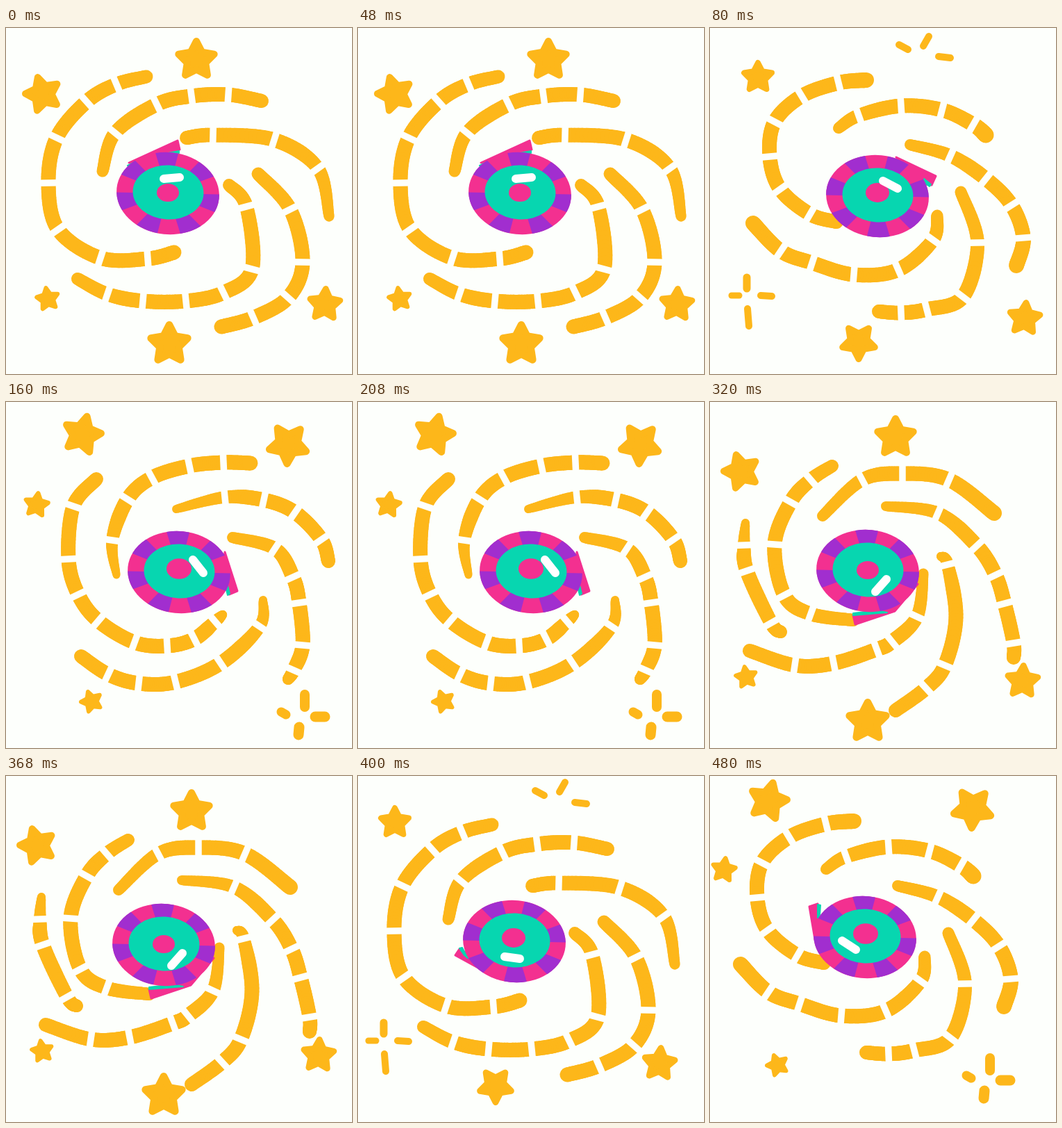
Write an HTML page with a canvas that moves like this. It is 498 by 498 pixels and loops after 0.56 s.

```html
<!DOCTYPE html>
<html lang="en">
<head>
<meta charset="utf-8">
<title>Swirling eye</title>
<style>
  html, body { margin: 0; width: 100%; height: 100%; overflow: hidden; background: #fdfffc; }
  canvas { display: block; }
</style>
</head>
<body>
<canvas id="stage" width="498" height="498"></canvas>
<script>
const ctx = document.getElementById('stage').getContext('2d');
const PAPER = '#fdfffc', GOLD = '#fdb71a', PINK = '#f33090', PURPLE = '#a12ecf', TEAL = '#07d6b0';
const STEP = 80;

// Arm: start width, end width, points. Inner points are gaps unless marked "~".
const swirls = [
  ['19 21 202,70 159,81 116,106 73,158 61,223 75,290 136,331 204,332 242,323',
   '17 20 139,206 157,151 217,110 267,98 320,96 368,105',
   '20 15 260,158 298,154 386,161 449,202 465,271',
   '19 21 363,210 409,261 427,337 406,388 356,417 310,430',
   '18 18 321,226 346,257 354,347 313,381 259,393 197,393 146,383 103,361'],
  ['22 20 225,75 185,79 132,98 93,135 86,185 101,232 144,268 182,279',
   '16 23 185,144 214,126 275,112 334,118 379,139 397,154',
   '16 22 288,168 346,184 397,217 434,255 451,302 441,342',
   '17 20 361,236 385,309 364,387 312,405 275,410 243,408',
   '17 22 327,270 321,305 271,348 207,355 147,338 102,321 62,281'],
  ['20 12 130,111 97,150 90,226 104,277 133,315 185,346 232,351 271,341 301,316 312,306',
   '11 21 159,249 153,199 175,140 210,109 264,92 313,87 352,88',
   '12 20 245,154 315,137 371,141 416,159 454,198 464,229',
   '16 16 326,195 387,211 413,252 422,289 427,350 414,386 406,399',
   '12 20 370,285 365,323 309,376 244,403 191,405 147,392 108,366'],
  ['18 13 150,89 105,114 74,178 70,233 87,281 128,318 174,334 218,335 250,327 272,318',
   '14 20 135,217 142,172 184,129 228,109 286,106 334,114 377,129',
   '13 22 248,157 325,161 379,179 424,213 450,259 450,292',
   '14 16 315,219 373,252 389,298 388,334 371,390 352,419 334,432',
   '14 22 332,316 323,345 248,378 170,384 118,368 78,340 51,310'],
  ['12 18 51,174 49,206 53,243 88,318 102,331',
   '18 18 176,92 145,112 116,144 93,205 107,278 145,305 206,314',
   '16 22 162,164 219,112 277,103 344,112 409,160',
   '14 20 253,150 328,160 384,207 411,249 424,290 437,347 437,368',
   '12 20 332,222 342,234 ~354,310 338,379 311,412 267,444',
   '15 20 307,247 298,309 262,345 240,356 178,376 122,379 57,358']
];

// Spark: width and two ends
const dashes = ['10 272,24 285,31', '10 307,26 315,12', '10 329,41 346,43'];
const cross = ['11 53,359 53,375', '9 31,385 42,385', '10 73,385 89,386', '10 54,404 56,429'];
const petals = ['14 430,421 430,439', '13 396,446 403,450', '15 445,453 459,453', '15 422,468 421,479'];
const burst = ['12 462,329 462,349', '11 398,440 413,422', '10 352,440 366,446',
  '12 359,486 372,468', '11 403,470 419,481'];

// Stars: x, y, radius, tilt in degrees. Eye: centre. Pupil: x, y, radius.
const poses = [
  { swirl: 0, eye: [233, 238], pupil: [233, 237, 16], shine: '12 227,217 250,215',
    tail: '177,194 247,162 250,175 215,192', lining: '175,198 198,187 249,177 249,180 210,192',
    stars: [[274, 46, 32, 0], [53, 95, 30, -17], [235, 455, 33, 0], [60, 390, 19, -9], [459, 398, 27, 3]] },
  { swirl: 1, eye: [241, 242], pupil: [241, 237, 17], shine: '12 249,220 270,231',
    tail: '268,186 325,213 319,226 300,224', lining: '308,217 318,225 316,228 310,224',
    stars: [[69, 71, 25, 0], [214, 452, 29, 36], [453, 418, 27, 5]],
    sparks: [[dashes, 0, 0], [cross, 0, 0]] },
  { swirl: 2, eye: [249, 245], pupil: [249, 240, 18], shine: '12 269,227 284,246',
    tail: '315,216 333,272 321,277 312,255', lining: '315,262 319,264 322,276 319,278',
    stars: [[110, 47, 32, 14], [406, 61, 33, -33], [44, 148, 20, 8], [123, 431, 18, -20]],
    sparks: [[petals, 0, 0]] },
  { swirl: 3, eye: [237, 244], pupil: [240, 244, 19], shine: '12 269,231 273,256',
    tail: '310,254 286,320 274,315 294,285', lining: '272,312 290,293 293,290 276,314',
    stars: [[242, 43, 21, -18], [447, 100, 38, 2], [83, 107, 19, -5], [137, 420, 18, 10]],
    sparks: [[burst, 0, 0]] },
  { swirl: 4, eye: [227, 243], pupil: [227, 242, 16], shine: '12 238,273 254,255',
    tail: '206,307 209,320 266,301 299,262 240,302', lining: '206,304 240,300 255,303 206,307',
    stars: [[267, 51, 32, 0], [45, 100, 30, -17], [227, 460, 33, 0], [52, 396, 18, -9], [450, 402, 27, 3]] },
  { swirl: 0, dx: -9, dy: 0, eye: [225, 238], pupil: [224, 233, 17], shine: '12 211,260 233,263',
    tail: '140,258 146,249 170,262 200,291', lining: '146,248 150,247 158,262 153,258',
    stars: [[53, 67, 25, 0], [198, 446, 28, 36], [434, 414, 27, 5]],
    sparks: [[dashes, -17, -3], [cross, -16, -4]] },
  { swirl: 1, dx: -18, dy: -10, eye: [223, 232], pupil: [224, 227, 18], shine: '12 190,237 210,250',
    tail: '143,188 155,184 158,215 151,235', lining: '155,185 159,186 158,200 155,204',
    stars: [[84, 36, 32, 14], [378, 47, 33, -33], [20, 135, 20, 8], [97, 416, 18, -20]],
    sparks: [[petals, -27, -15]] }
];

const points = words => words.map(w => w.replace('~', '').split(',').map(Number));

function line(a, b, width, color, cap = 'round') {
  ctx.strokeStyle = color;
  ctx.lineWidth = width;
  ctx.lineCap = cap;
  ctx.beginPath();
  ctx.moveTo(...a);
  ctx.lineTo(...b);
  ctx.stroke();
}

function blob(pts, color, soft) {
  ctx.fillStyle = ctx.strokeStyle = color;
  ctx.lineWidth = soft;
  ctx.lineJoin = 'round';
  ctx.beginPath();
  pts.forEach(p => ctx.lineTo(...p));
  ctx.closePath();
  ctx.fill();
  ctx.stroke();
}

function oval(x, y, rx, ry, color, tilt = 0) {
  ctx.fillStyle = color;
  ctx.beginPath();
  ctx.ellipse(x, y, rx, ry, tilt, 0, 7);
  ctx.fill();
}

function spark(text) {
  const [width, ...ends] = text.split(' ');
  line(...points(ends), +width, GOLD);
}

function arm(text) {
  const [first, last, ...words] = text.split(' ');
  const p = points(words), n = p.length - 1;
  const slope = i => [0, 1].map(k => (p[Math.min(i + 1, n)][k] - p[Math.max(i - 1, 0)][k]) / 2);
  const near = i => Math.max(0, 1 - i / 1.5);
  const width = i => 21 + (first - 21) * near(i) + (last - 21) * near(n - i);
  for (let i = 0; i < n; i++) {
    const a = slope(i), b = slope(i + 1);
    const at = t => [0, 1].map(k =>
      p[i][k] * (1 + 2 * t) * (1 - t) ** 2 + a[k] * t * (1 - t) ** 2 +
      p[i + 1][k] * t * t * (3 - 2 * t) + b[k] * t * t * (t - 1));
    for (let s = 0; s < 16; s++) line(at(s / 16), at((s + 1) / 16), width(i + s / 16), GOLD);
  }
  for (let i = 1; i < n; i++) {
    if (words[i][0] === '~') continue;
    const [x, y] = p[i], [u, v] = slope(i), k = 14 / Math.hypot(u, v);
    line([x - v * k, y + u * k], [x + v * k, y - u * k], 9.5, PAPER, 'butt');
  }
}

function star([x, y, r, tilt]) {
  const pts = [];
  for (let i = 0; i < 10; i++) {
    const a = (tilt - 90 + i * 36) * Math.PI / 180, d = r * (i % 2 ? 0.43 : 0.84);
    pts.push([x + d * Math.cos(a), y + d * Math.sin(a)]);
  }
  blob(pts, GOLD, r * 0.32);
}

function eye(pose, turn) {
  const [x, y] = pose.eye, [px, py, pr] = pose.pupil, slice = Math.PI / 7;
  blob(points(pose.tail.split(' ')), PINK, 3);
  blob(points(pose.lining.split(' ')), TEAL, 2);
  oval(x, y, 74, 59, PINK, 0.1);
  ctx.fillStyle = PURPLE;
  for (let i = 0; i < 7; i++) {
    const a = -Math.PI / 2 - 0.1 + (2 * i + turn - 0.5) * slice;
    ctx.beginPath();
    ctx.moveTo(x, y);
    ctx.ellipse(x, y, 74, 59, 0.1, a, a + slice);
    ctx.fill();
  }
  oval(x + 0.5, y - 1.5, 51, 39, TEAL, 0.05);
  oval(px, py, pr, pr * 0.82, PINK);
  const [w, ...ends] = pose.shine.split(' ');
  line(...points(ends), +w, '#fff');
}

function shifted(dx, dy, draw) {
  ctx.save();
  ctx.translate(dx, dy);
  draw();
  ctx.restore();
}

function render(now) {
  const i = Math.floor(now / STEP) % poses.length, pose = poses[i];
  ctx.fillStyle = PAPER;
  ctx.fillRect(0, 0, 498, 498);
  shifted(pose.dx || 0, pose.dy || 0, () => swirls[pose.swirl].forEach(arm));
  pose.stars.forEach(star);
  for (const [set, dx, dy] of pose.sparks || []) shifted(dx, dy, () => set.forEach(spark));
  eye(pose, i % 2);
}

const start = performance.now();
function tick() {
  render(performance.now() - start);
  requestAnimationFrame(tick);
}
tick();
</script>
</body>
</html>
```
